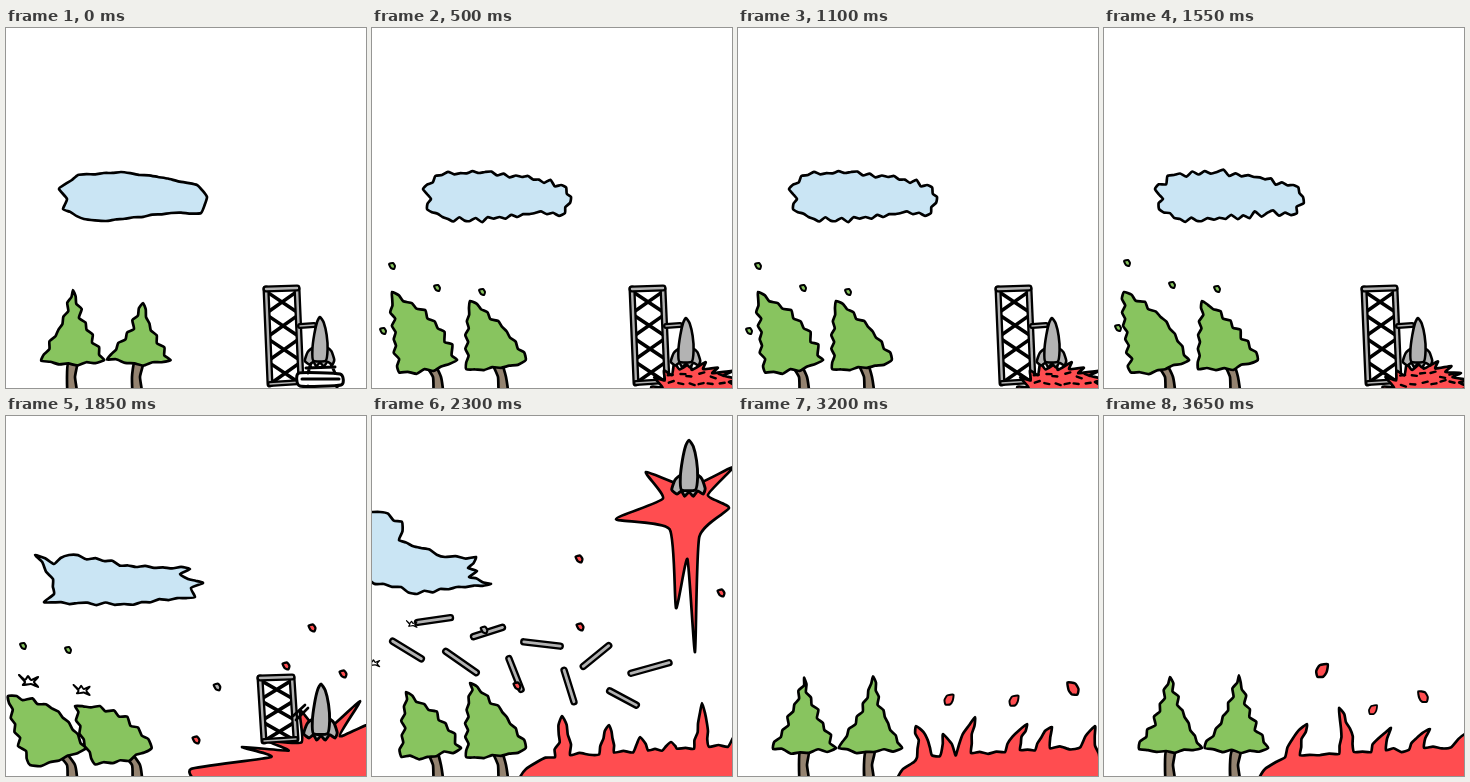
Write an HTML page that moves like this. It is 360 px wide and 360 px high and loops after 3800 ms.

```html
<!DOCTYPE html>
<html lang="en">
<head>
<meta charset="utf-8">
<title>Launch</title>
<style>
html, body { margin: 0; width: 100%; height: 100%; overflow: hidden; background: #fff; }
svg { display: block; width: 100vw; height: 100vh; }
</style>
</head>
<body>
<svg id="stage" viewBox="0 0 360 360" stroke-linejoin="round" stroke-linecap="round"></svg>
<script>
const GREEN = '#88c45f', BROWN = '#948370', RED = '#ff4d50', GRAY = '#b3b3b3', SKY = '#cae5f4', INK = '#000';
const LOOP = 3800, HOLD = 500, STEP = 150;

const parse = s => s.split(' ').map(p => p.split(',').map(Number));
const mix = (a, b, f) => a + (b - a) * f;
const blend = (a, b, f) => [mix(a[0], b[0], f), mix(a[1], b[1], f)];
const range = (n, fn) => Array.from({ length: n }, (_, i) => fn(i));
const group = (transform, art) => `<g transform="${transform}">${art}</g>`;
const move = (x, y, art, sx = 1, sy = sx) => group(`translate(${x} ${y}) scale(${sx} ${sy})`, art);

function random(seed) {
  let n = seed * 7919 + 17;
  return () => {
    const v = Math.sin(n++ * 12.9898) * 43758.5453;
    return v - Math.floor(v);
  };
}

// Values of [step, ...values] rows, linear in between
function track(rows, i) {
  const k = Math.max(1, rows.findIndex(r => r[0] >= i));
  const a = rows[k - 1], b = rows[k], f = (i - a[0]) / (b[0] - a[0]);
  return a.slice(1).map((v, j) => mix(v, b[j + 1], f));
}

// Hand-drawn edge: bowed sideways, with small zigzags; the end point is left out
function edge(a, b, bow, amp, gap, rnd) {
  const dx = b[0] - a[0], dy = b[1] - a[1], len = Math.hypot(dx, dy) || 1;
  const n = Math.max(1, Math.round(len / gap));
  return range(n, j => {
    const f = j / n, off = bow * Math.sin(Math.PI * f) + (j ? amp * rnd() * (j % 2 ? 1 : -1) : 0);
    return [a[0] + dx * f + dy / len * off, a[1] + dy * f - dx / len * off];
  });
}
function rough(p, amp, gap, seed) {
  const rnd = random(seed);
  return p.flatMap((a, i) => edge(a, p[(i + 1) % p.length], 0, amp, gap, rnd));
}

// Closed outline with lightly rounded corners
function blob(p, fill, width = 2.7) {
  const n = p.length, k = 0.09;
  let d = 'M' + p[0];
  p.forEach((b, i) => {
    const a = p[(i + n - 1) % n], c = p[(i + 1) % n], e = p[(i + 2) % n];
    d += `C${b[0] + (c[0] - a[0]) * k},${b[1] + (c[1] - a[1]) * k} ${c[0] - (e[0] - b[0]) * k},${c[1] - (e[1] - b[1]) * k} ${c}`;
  });
  return `<path d="${d}Z" fill="${fill}" stroke="${INK}" stroke-width="${width}"/>`;
}
const line = (d, width = 2.7, color = INK) => `<path d="${d}" fill="none" stroke="${color}" stroke-width="${width}"/>`;
function bar(x1, y1, x2, y2, w = 7) {
  const d = `M${x1},${y1}L${x2},${y2}`;
  return line(d, w) + line(d, w - 4.6, GRAY);
}

const clouds = {
  calm: '53,161 72,147 115,144 152,149 191,157 201,169 195,185 165,185 100,193 78,191 57,181 61,171',
  torn: '29,139 48,148 63,139 98,145 130,151 184,153 174,158 182,163 197,167 185,172 189,181 118,188 72,187 38,186 48,178 47,163',
  blown: '-60,100 -5,96 8,96 30,106 27,124 49,132 73,141 104,141 96,152 105,155 97,161 119,168 68,173 45,178 12,168 -60,150'
};
const cloud = (pose, amp, gap, seed, dx = 0, dy = 0) => move(dx, dy, blob(rough(parse(clouds[pose]), amp, gap, seed), SKY));
function sky(i) {
  if (i === 0) return cloud('calm', 0.7, 9, 1);
  if (i < 9) return cloud('calm', 3.2, 6, 2 + i % 2, -2, 0);
  if (i < 12) return cloud('torn', 1.8, 9, i, -20 * (i - 10), -12 * (i - 10));
  return i < 15 ? cloud('blown', 2.2, 9, i, -45 * (i - 13), -4 * (i - 13)) : '';
}

// The crown tilts left by `lean`; its corners follow by a smaller share
function tree(x, lean, top, seed) {
  const rnd = random(seed), tip = [x - lean, top];
  const left = [x - 31 - lean * 0.17, 333 + lean * 0.25], right = [x + 32 - lean * 0.28, 332];
  const root = x - lean * 0.2;
  const crown = [
    ...edge(tip, right, lean * 0.27 - 3, 3, 7, rnd),
    ...edge(right, left, 4, 2.2, 9, rnd),
    ...edge(left, tip, lean * 0.1 - 3, 3, 7, rnd)
  ];
  const trunk = [[root - 4, 335], [root + 5, 335], [x + 3, 349], [x + 5, 366], [x - 4, 366], [x - 5, 349]];
  return blob(trunk, BROWN) + blob(crown, GREEN);
}
// step, lean and top of the left tree, lean and top of the right tree
const sway = [
  [0, -1, 262, -6, 275], [1, 46, 264, 33, 273], [8, 46, 264, 33, 273],
  [10, 64, 280, 62, 290], [13, 32, 276, 33, 267], [17, 0, 262, -4, 261], [23, 0, 261, -4, 259]
];
function grove(i) {
  const [a, topA, b, topB] = track(sway, i), seed = i ? 4 + i % 2 : 8;
  return tree(66, a, topA, seed) + tree(131, b, topB, seed + 20);
}

// Spikes around a centre, with a valley between each pair of tips
function star(c, tips, tail = []) {
  const last = tail.length ? tips.length - 1 : tips.length;
  const p = tips.flatMap((t, i) => i < last ? [t, blend(blend(t, tips[(i + 1) % tips.length], 0.5), c, 0.55)] : [t]);
  return blob([...p, ...tail], RED);
}
function ignite(seed) {
  const rnd = random(seed);
  const tips = range(10, j => {
    const a = Math.PI * (1.04 + j / 9.5), r = 0.95 + rnd() * 0.2;
    return [324 + 44 * r * Math.cos(a), 362 + 27 * r * Math.sin(a)];
  });
  const p = tips.flatMap(t => [t, blend(t, [324, 362], 0.25)]);
  return blob([...p, [370, 370], [286, 370]], RED);
}
function sparks(seed) {
  const rnd = random(seed);
  return line(range(12, j => `M${294 + j % 6 * 10 + rnd() * 5},${345 + (j > 5 ? 8 : 0) + rnd() * 4}l5,${rnd() * 4 - 2}`).join(''), 2.4);
}
const burst = s => star([310, 340], parse('185,353 236,331 262,325 294,294 354,285 372,307').map(t => blend([310, 340], t, s)), [[372, 370], [205, 370]]);

// Burning ground; tongues are tipX,tipY,rootX
const tongues = {
  spread: '190,300,191 237,309,235 268,321,269 299,326,298 330,287,330 369,314,364',
  low: '178,310,187 205,318,210 237,301,226 289,308,275 314,311,305 357,310,350',
  high: '203,308,189 235,292,243 287,312,275 326,313,313 369,316,355'
};
function fire(pose, left, seed) {
  const ground = x => 343 - (x - 160) * 0.06;
  const p = [[left, 370], [left + 9, 353], [left + 20, 346]];
  for (const [tx, ty, r] of parse(tongues[pose])) {
    const y = ground(r), neck = mix(y, ty, 0.55), mid = mix(r, tx, 0.25);
    p.push([r - 8, y], [mid - 4, neck], [tx, ty], [mid + 5, neck], [r + 7, y - 2]);
  }
  return blob(rough([...p, [372, 370]], 2.2, 9, seed), RED);
}

function tower(x, top, bottom, cells, drift, w = 31) {
  const at = f => [x + drift * f, mix(top, bottom, f)];
  const [ex, ey] = at(1);
  const braces = range(cells, i => {
    const [ax, ay] = at((i + 0.1) / cells), [bx, by] = at((i + 1) / cells);
    return line(`M${ax},${ay}L${bx + w},${by}M${ax + w},${ay}L${bx},${by}`, 3.6);
  }).join('');
  return braces + bar(x, top, ex, ey) + bar(x + w, top, ex + w, ey - 2) + bar(ex, ey, ex + w, ey - 2, 6) + bar(x, top, x + w, top - 1);
}
const arm = bar(294, 298, 308, 297, 6);
const pad = blob(parse('293,345 334,346 335,357 294,358'), '#fff', 3) +
  line('M300,340L329,339M296,351L333,351M305,335L302,345M325,336L329,345M302,358V365M331,358V365', 3);

const FINS = parse('-7,32 -13,37 -16,46 -11,50 -7,47 -4,52 0,48 4,52 8,47 13,50 15,45 12,36 7,32');
const HULL = parse('0,0 4,6 7,19 8,34 6,46 -7,46 -8,34 -6,18 -3,5');
const rocket = (y, x = 314, s = 1) => move(x, y, blob(FINS, GRAY) + blob(HULL, GRAY), s);
const PLUME = parse('-43,32 -73,79 -13,168 6,212 40,68 44,27');
const flight = y => move(317, y, star([0, 61], PLUME)) + rocket(y, 317, 1.08);

// Tower pieces fly out from the pad; k = 1 is half way
function debris(k) {
  const rnd = random(6);
  return range(10, i => {
    const x = 35 + 27 * i, y = 222 + 6 * i + (i % 2 ? -24 : 12), half = 15 + rnd() * 5;
    const turn = rnd() * 60 + (i % 2 ? -50 : 25) + (k - 1) * 90;
    const drop = k > 1 ? 70 * (k - 1) ** 2 : 0;
    return group(`translate(${mix(272, x, k)} ${mix(300, y, k) + drop}) rotate(${turn})`, bar(-half, 0, half, 0, 7.4));
  }).join('');
}

const chip = (x, y, fill, s = 1) => move(x, y, blob(parse('-3,-2 1,-3 3,0 2,3 -1,2'), fill, 2), s);
const bird = (x, y, s) => move(x, y, blob(parse('-10,-6 -4,-1 -1,-5 2,-1 9,-4 5,1 9,6 2,3 -6,4 -4,1'), '#fff', 2.2), s);
const ember = (x, y, s = 1) => move(x, y, blob(parse('5,-6 -2,-5 -5,0 -4,5 1,5 4,1'), RED, 2.2), s, Math.abs(s));

const leaves = parse('20,238 65,260 110,264 11,303');
// x, y and drift per step
const scraps = parse('306,212,-33,-23 337,258,4,-27 190,324,-15,-18 280,250,-24,-13');
function flying(i) {
  const gust = Math.max(0, i - 8), k = i - 10, shake = i < 9 && i % 2 === 0 ? 3 : 0;
  let s = '';
  if (i < 13) s += leaves.map(([x, y]) => chip(x - 24 * gust + shake, y - 15 * gust - shake, GREEN)).join('');
  if (i < 9) return s;
  if (i < 14) s += bird(23 - 7 * k, 265 - 6 * k, 1 - 0.13 * k) + bird(76 - 12 * k, 274 - 22 * k, 0.85 - 0.1 * k);
  s += chip(211 - 33 * k, 271 - 19 * k, GRAY, 1.1);
  return s + scraps.map(([x, y, dx, dy]) => chip(x + dx * k, y + dy * k, RED, 1.15)).join('');
}

function scene(i) {
  const back = sky(i) + grove(i);
  if (i === 0) return back + tower(260, 261, 356, 4, 4) + arm + pad + rocket(289, 314, 0.95);
  if (i < 9) return back + flying(i) + tower(260, 261, 355, 4, 4) + arm + ignite(i % 2) + sparks(i % 2) + rocket(290, 314, 0.95);
  if (i === 9) return back + flying(i) + tower(258, 261, 340, 4, 4) + arm + burst(0.75) + rocket(284);
  if (i === 10) return back + flying(i) + burst(1) + tower(254, 262, 325, 3, 4, 32) + line('M287,300L299,289M290,304L302,292') + rocket(268, 315, 1.08);
  if (i < 17) {
    const ground = i === 11 ? burst(1.1) : i === 12 ? move(0, 15, fire('spread', 160, i)) : i < 15 ? fire('spread', 145, i) : fire('high', 150, i);
    return back + ground + debris(0.35 + (i - 11) * 0.325) + (i < 15 ? flight(268 - 81.3 * (i - 10)) : '') + flying(i);
  }
  return back + (i % 2
    ? fire('low', 156, 3) + ember(211, 284, 0.9) + ember(276, 285, 0.9) + ember(335, 273, -1.1)
    : fire('high', 152, 4) + ember(218, 255, 1.15) + ember(269, 294, 0.8) + ember(319, 281, -0.95));
}

const stage = document.getElementById('stage');
const start = performance.now();
let shown = -1;
function draw() {
  const t = (performance.now() - start) % LOOP;
  const i = t < HOLD ? 0 : 1 + Math.floor((t - HOLD) / STEP);
  if (i !== shown) stage.innerHTML = scene(shown = i);
  requestAnimationFrame(draw);
}
draw();
</script>
</body>
</html>
```
